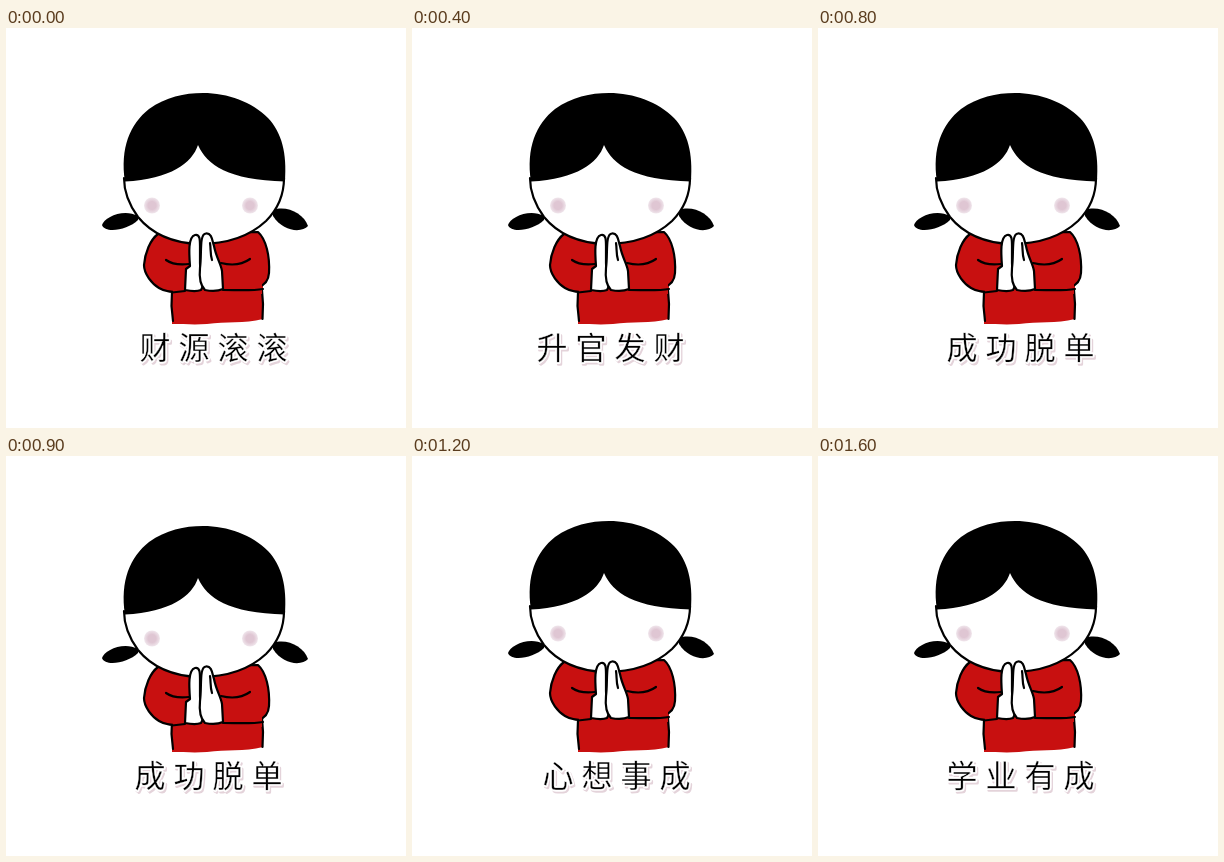
Recreate the animation shown at these times as an HTML page. Size 400x400 px, loop 1.7 s.

```html
<!DOCTYPE html>
<html lang="zh">
<head>
<meta charset="utf-8">
<style>
html, body { margin: 0; width: 100%; height: 100%; overflow: hidden; background: #fff; }
svg { display: block; width: 100vw; height: 100vh; }
text { font-family: "Noto Sans CJK SC", "Noto Sans CJK", sans-serif; font-size: 31px; font-weight: 300; text-anchor: middle; }
.line { fill: none; stroke: #000; stroke-width: 2.2; stroke-linecap: round; stroke-linejoin: round; }
.red { fill: #c81010; }
.white { fill: #fff; }
.shade { fill: #e4d3da; stroke: #e4d3da; stroke-width: 3; stroke-linejoin: round; }
.halo { fill: #fff; stroke: #fff; stroke-width: 3.4; stroke-linejoin: round; }
.ink { fill: #000; stroke: #fff; stroke-width: .4; }
</style>
</head>
<body>
<svg viewBox="0 0 400 400">
  <defs>
    <radialGradient id="blush">
      <stop offset=".5" stop-color="#dfc6d3"/>
      <stop offset="1" stop-color="#f0e6ec"/>
    </radialGradient>
  </defs>

  <g id="torso">
    <path class="red" d="M166 225 H257 V291 C238 296 220 293 201 296 C188 297 178 296 166 296 Z"/>
    <path class="line" d="M166 264 L165.500 278 L167 293 M256 262 L257 276 L256.500 291"/>
  </g>

  <g id="upper">
    <path class="line red" d="M152 206 C144 212 139 225 138 237 C138 246 146 256 153 260 C161 265 170 264 178 264 L217 262 C250 261 262 261 263 245 C264 228 260 211 252 204 Z"/>
    <path class="red" d="M167 250 H256 V266 H167 Z"/>
    <path class="line" d="M160 232 C167 237 175 237 183 236 M215 235 C227 238 237 236 244 231 M166 264.500 L179 263 M217 262 C232 262 246 263 257 261"/>
    <path d="M132 188 C118 180 98 189 96 197 C99 206 122 202 132 192 Z"/>
    <path d="M267 182 C281 177 298 186 302 198 C296 205 277 204 267 188 Z"/>
    <path class="line white" d="M118 150 C118 165 124 178 132 189 C146 206 166 215 193 216 C222 216 245 207 260 193 C271 182 278 167 278 150"/>
    <path d="M119 153.500 C114 120 124 96 143 81 C160 69 178 65 197 65 C222 65 246 74 262 90 C276 105 281 125 279 153.500 C222 152 201 137 192 117 C186 135 165 151 119 153.500 Z"/>
    <circle cx="146" cy="177.500" r="8" fill="url(#blush)"/>
    <circle cx="244" cy="177.500" r="8" fill="url(#blush)"/>
    <path class="line white" d="M180 241 L184 238 C183 225 182 209 189 207 C194 206 194 212 194 218 L194 235 C194 245 198 254 197 258 L195 262 C190 264 184 263 179 262 Z"/>
    <path class="line white" d="M194 240 C196 225 193 206 200 205.500 C206 205 206 212 208 218 C210 229 215 236 216 243 L217 261 C210 264 204 263 199 262 C195 258 193 250 194 240 Z"/>
    <path class="line" d="M204 215 C205 221 204 226 206 232"/>
  </g>

  <g id="caption"></g>
</svg>
<script>
const FRAME = 100, LOOP = 1700, BOW = 5;
const GAP = 39, BASELINE = 331;

// Each wish with the centre of its first character and how many frames it stays.
const wishes = [
  { text: "财源滚滚", x: 149, hold: 4 },
  { text: "升官发财", x: 140, hold: 2 },
  { text: "鸡年大吉", x: 148, hold: 2 },
  { text: "成功脱单", x: 144, hold: 2 },
  { text: "心想事成", x: 146, hold: 4 },
  { text: "环游世界", x: 142, hold: 2 },
  { text: "学业有成", x: 144, hold: 1 }
];
const timeline = wishes.flatMap(w => Array(w.hold).fill(w));

const upper = document.getElementById("upper");
const caption = document.getElementById("caption");

function layer(name, shift, wish) {
  return [...wish.text].map((c, i) =>
    `<text class="${name}" x="${wish.x + GAP * i + shift}" y="${BASELINE + shift}">${c}</text>`
  ).join("");
}

let shown = -1;
function draw(time) {
  const step = Math.floor((time % LOOP) / FRAME);
  if (step === shown) return;
  shown = step;
  const wish = timeline[step];
  upper.setAttribute("transform", `translate(0 ${step % 2 ? BOW : 0})`);
  caption.innerHTML = layer("shade", 1.6, wish) + layer("halo", 0, wish) + layer("ink", 0, wish);
}

const start = performance.now();
function tick() {
  draw(performance.now() - start);
  requestAnimationFrame(tick);
}
tick();
</script>
</body>
</html>
```
